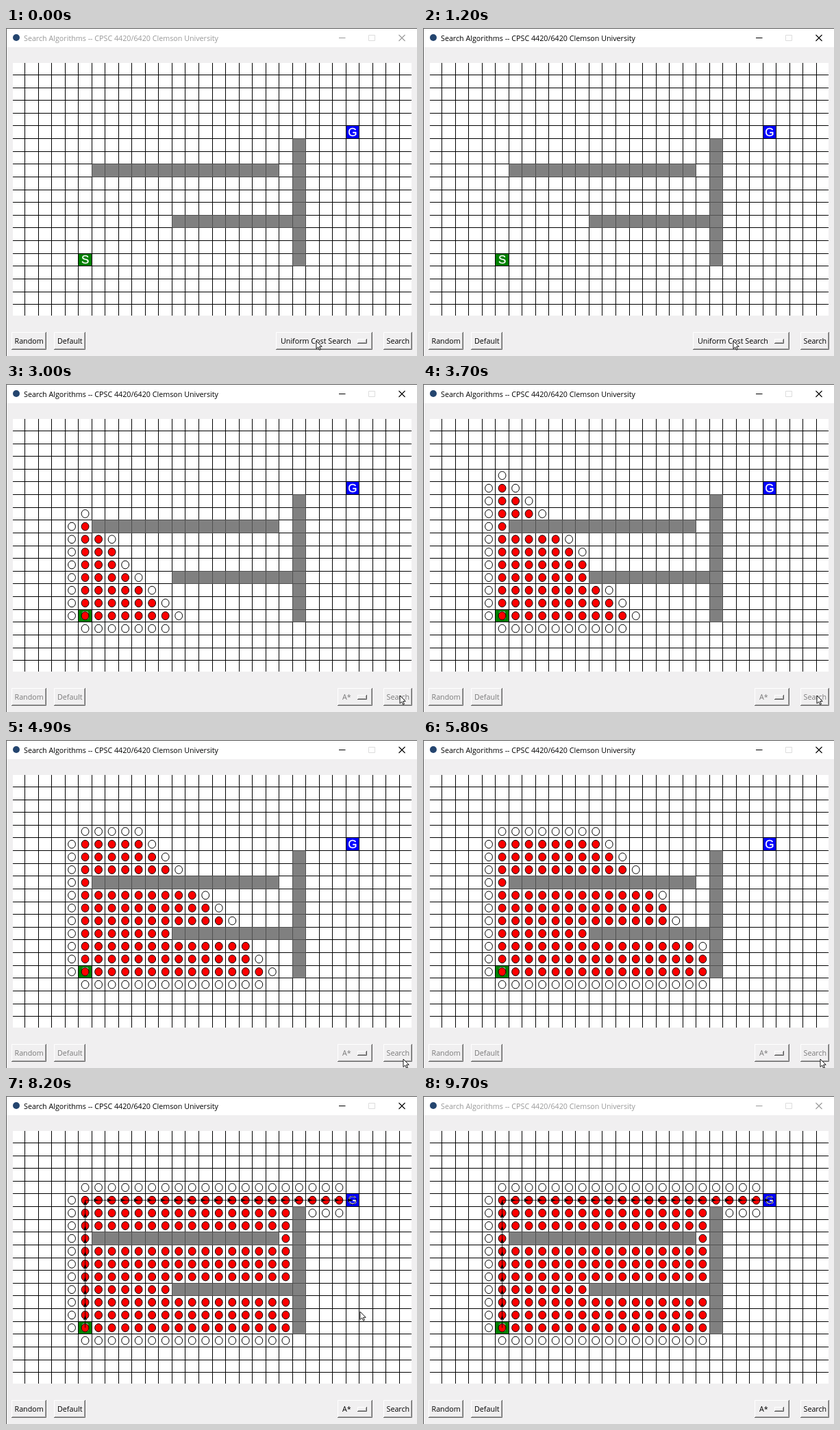
These frames come from a looping animation (600 by 479 pixels, 9800 ms). An HTML page:

```html
<!DOCTYPE html>
<html lang="en">
<head>
<meta charset="utf-8">
<title>Search Algorithms</title>
<style>
  html, body { margin: 0; width: 100%; height: 100%; overflow: hidden; background: #f0eff0; }
  svg { display: block; width: 600px; height: 479px; }
  text { font: 10.72px "Open Sans", "Noto Sans", sans-serif; }
  .mark { font: 17px "Liberation Sans", Arial, sans-serif; fill: #fff; stroke: #fff; stroke-width: 0.3; text-anchor: middle; }
</style>
</head>
<body>
<svg id="stage" viewBox="0 0 600 479"></svg>
<script>
const LOOP = 9800;
const COLS = 30, ROWS = 20, CELL_W = 19.52, CELL_H = 18.63, LEFT = 8.2, TOP = 49.75;
const START = [5, 15], GOAL = [25, 5];
const ACTIVE = 400, BLUR = 9300, PICK = 1500, SEARCH = 2366;
const CURSOR = [
  [0, 453, 457], [1500, 453, 457], [2050, 575, 455], [4200, 575, 455], [4500, 580, 466],
  [7300, 580, 466], [8000, 517, 315], [8600, 517, 315], [9150, 612, 330]
];

const stage = document.getElementById('stage');

function add(tag, attrs, parent = stage) {
  const el = document.createElementNS('http://www.w3.org/2000/svg', tag);
  for (const key in attrs) el.setAttribute(key, attrs[key]);
  parent.appendChild(el);
  return el;
}
const rect = (x, y, width, height, fill, parent) => add('rect', { x, y, width, height, fill }, parent);
const path = (d, attrs, parent) => add('path', { d, fill: 'none', ...attrs }, parent);
function label(x, y, str, attrs, parent) {
  const el = add('text', { x, y, ...attrs }, parent);
  el.textContent = str;
  return el;
}
const show = (el, on) => el.setAttribute('visibility', on ? 'visible' : 'hidden');

const lineX = c => Math.floor(LEFT + CELL_W * c);
const lineY = r => Math.floor(TOP + CELL_H * r);
const midX = c => LEFT + CELL_W * (c + 0.5);
const midY = r => TOP + CELL_H * (r + 0.5);

const isWall = (c, r) =>
  (r === 8 && c >= 6 && c <= 19) ||
  (r === 12 && c >= 12 && c <= 20) ||
  (c === 21 && r >= 6 && r <= 15);

// Each redraw takes longer as more items are on the board.
const eventTime = n => SEARCH + 7.13 * n + 0.087 * n * n;

// A* with Manhattan distance; ties leave the queue in order of arrival.
function solve() {
  const seen = new Set(), open = [], nodes = [];
  let count = 0;
  const push = (c, r, g, parent) => {
    const f = g + Math.abs(c - GOAL[0]) + Math.abs(r - GOAL[1]);
    const node = { c, r, g, f, parent, born: eventTime(++count), done: Infinity };
    seen.add(r * COLS + c);
    nodes.push(node);
    open.push(node);
  };
  push(...START, 0, null);
  while (open.length) {
    let best = 0;
    open.forEach((node, i) => { if (node.f < open[best].f) best = i; });
    const node = open.splice(best, 1)[0];
    if (node.c === GOAL[0] && node.r === GOAL[1]) return { nodes, goal: node, end: eventTime(count + 1) };
    node.done = eventTime(count);
    for (const [dc, dr] of [[0, -1], [-1, 0], [0, 1], [1, 0]]) {
      const c = node.c + dc, r = node.r + dr;
      const inside = c >= 0 && r >= 0 && c < COLS && r < ROWS;
      if (inside && !isWall(c, r) && !seen.has(r * COLS + c)) push(c, r, node.g + 1, node);
    }
  }
}
const { nodes, goal, end } = solve();

// Window frame
rect(0, 0, 600, 479, '#f0eff0');
rect(0, 0, 600, 28, '#fff');
path('M0.5 479V0.5H600', { stroke: '#555' });
add('circle', { cx: 15, cy: 14, r: 5, fill: '#24456f' });
const title = label(26, 18.5, 'Search Algorithms -- CPSC 4420/6420 Clemson University');
const controls = path('M486 14.5H495.5M573.5 10L582.5 19M582.5 10L573.5 19', { 'stroke-width': 1.1 });
path('M529.5 10.5h9v8h-9z', { stroke: '#dcdcdc' });

// Board
const clip = add('clipPath', { id: 'board' });
rect(10, 51, 582, 369, '#fff', clip);
const board = add('g', { 'clip-path': 'url(#board)' });
rect(10, 51, 582, 369, '#fff', board);

function fillCell(c, r, fill) {
  rect(lineX(c), lineY(r), lineX(c + 1) - lineX(c), lineY(r + 1) - lineY(r), fill, board);
}
let grid = '', wallEdges = '';
for (let c = 1; c < COLS; c++) grid += `M${lineX(c) + 0.5} 51V420`;
for (let r = 1; r < ROWS; r++) grid += `M10 ${lineY(r) + 0.5}H592`;
for (let r = 0; r < ROWS; r++) {
  for (let c = 0; c < COLS; c++) {
    if (!isWall(c, r)) continue;
    fillCell(c, r, '#808080');
    wallEdges += `M${lineX(c) + 0.5} ${lineY(r) + 0.5}H${lineX(c + 1) + 0.5}V${lineY(r + 1) + 0.5}H${lineX(c) + 0.5}z`;
  }
}
fillCell(...START, '#008000');
fillCell(...GOAL, '#0000ff');
path(grid, { stroke: '#000' }, board);
path(wallEdges, { stroke: '#505050' }, board);
label(midX(START[0]), midY(START[1]) + 5.7, 'S', { class: 'mark' }, board);
label(midX(GOAL[0]), midY(GOAL[1]) + 5.7, 'G', { class: 'mark' }, board);

for (const node of nodes) {
  node.el = add('ellipse', {
    cx: midX(node.c), cy: midY(node.r), rx: 5.4, ry: 5.9, stroke: '#000'
  }, board);
}

// Arrows from each cell of the route to the next
const route = add('g', {}, board);
for (let n = goal; n.parent; n = n.parent) {
  const x = midX(n.c), y = midY(n.r), px = midX(n.parent.c), py = midY(n.parent.r);
  path(`M${px} ${py}L${x} ${y}`, { stroke: '#000', 'stroke-width': 0.8 }, route);
  const angle = Math.atan2(y - py, x - px) * 180 / Math.PI;
  path('M0 0L-7.5 -2.6L-6 0L-7.5 2.6z', {
    fill: '#000', transform: `translate(${x} ${y}) rotate(${angle})`
  }, route);
}

// Buttons
function button(x, right, str, textX) {
  const g = add('g', {}), y = 444, bottom = 470;
  rect(x, y, right - x, bottom - y, '#f0eff0', g);
  path(`M${x + 0.5} ${bottom - 1}V${y + 0.5}H${right - 1}`, { stroke: '#fff' }, g);
  path(`M${x + 1} ${bottom - 1.5}H${right - 1.5}V${y + 1}`, { stroke: '#a0a0a0' }, g);
  path(`M${x} ${bottom - 0.5}H${right - 0.5}V${y}`, { stroke: '#696969' }, g);
  const text = label(textX, 461, str, {}, g);
  return { g, text };
}
function menuButton(x, str, textX) {
  const b = button(x, 535, str, textX);
  path('M513.5 460V454.5H526', { stroke: '#fff' }, b.g);
  path('M514 459.5H525.5V455', { stroke: '#a0a0a0' }, b.g);
  path('M513 460.5H526.5V454', { stroke: '#555' }, b.g);
  return b;
}
const uniform = menuButton(394, 'Uniform Cost Search', 401);
const aStar = menuButton(484, 'A*', 491);
const buttons = [
  button(8, 59, 'Random', 12.5), button(70, 116, 'Default', 75),
  button(551, 593, 'Search', 555.5), aStar
];

const pointer = path('M0 0V11.5L2.7 9L4.6 13.2L6.4 12.4L4.6 8.3H8.2z', { fill: '#fff', stroke: '#000', 'stroke-width': 0.9 });

function pointerAt(t) {
  const i = CURSOR.findIndex(k => k[0] > t);
  if (i < 0) return CURSOR[CURSOR.length - 1].slice(1);
  const [t0, x0, y0] = CURSOR[i - 1], [t1, x1, y1] = CURSOR[i];
  const p = (t - t0) / (t1 - t0), e = p * p * (3 - 2 * p);
  return [x0 + (x1 - x0) * e, y0 + (y1 - y0) * e];
}

function render(t) {
  const focused = t >= ACTIVE && t < BLUR;
  title.setAttribute('fill', focused ? '#000' : '#999');
  controls.setAttribute('stroke', focused ? '#000' : '#999');

  show(uniform.g, t < PICK);
  show(aStar.g, t >= PICK);
  const busy = t >= SEARCH && t < end;
  for (const b of buttons) b.text.setAttribute('fill', busy ? '#7a7a7a' : '#000');

  for (const node of nodes) {
    show(node.el, t >= node.born);
    node.el.setAttribute('fill', node === goal ? 'none' : t >= node.done ? '#f00' : '#fff');
  }
  show(route, t >= end);
  pointer.setAttribute('transform', `translate(${pointerAt(t).join(' ')})`);
}

const began = performance.now();
function tick() {
  render((performance.now() - began) % LOOP);
  requestAnimationFrame(tick);
}
tick();
</script>
</body>
</html>
```
